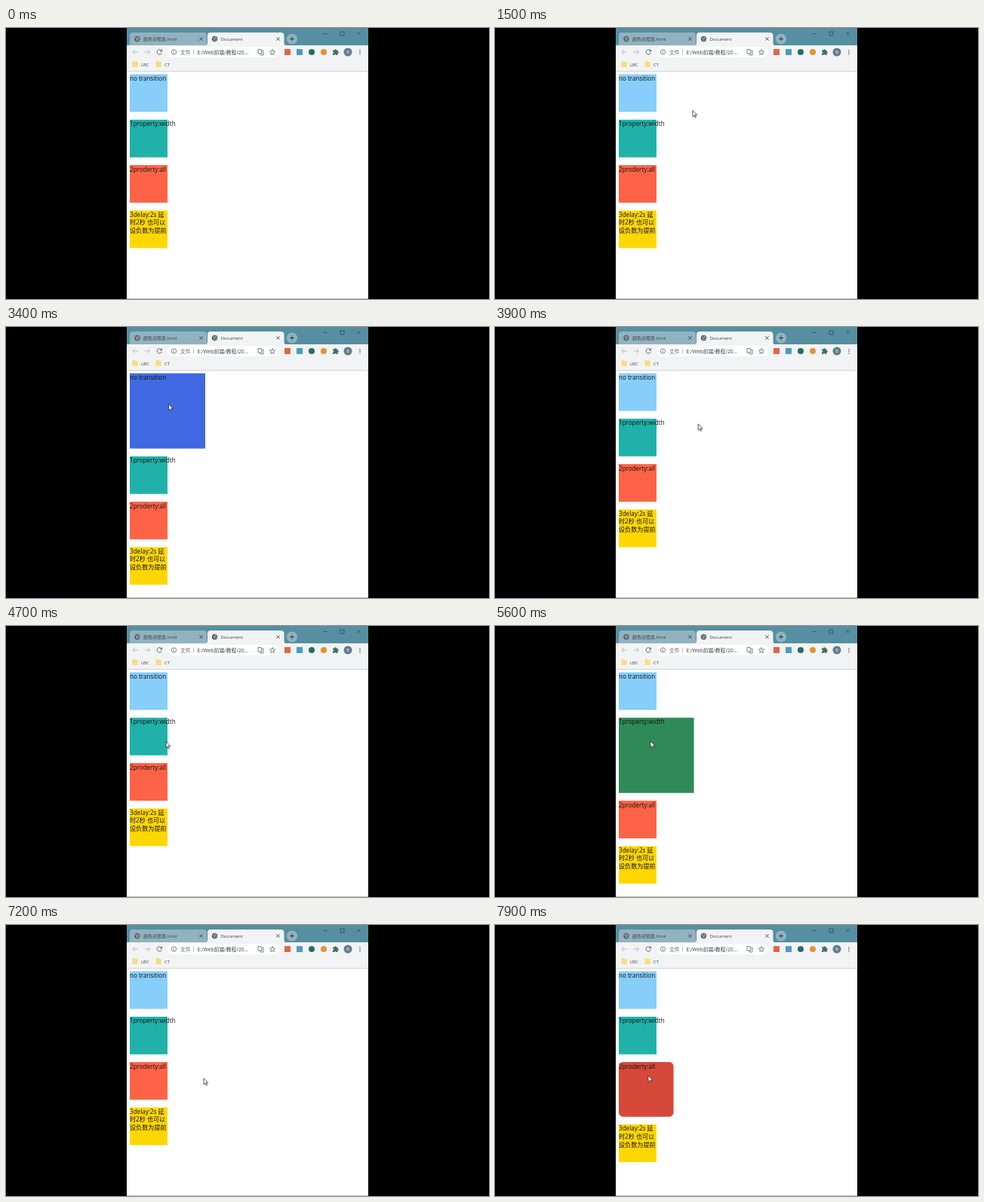
Write an HTML page that moves like this. It is 640x360 px and loops after 8 s.

```html
<!DOCTYPE html>
<html lang="zh-CN">
<head>
<meta charset="utf-8">
<title>Transitions</title>
<style>
html, body { margin: 0; width: 100%; height: 100%; overflow: hidden; background: #000; }
svg { display: block; width: 100vw; height: 100vh; }
text { font-family: "Open Sans", "Noto Sans CJK SC", "Noto Sans CJK", "Noto Sans", sans-serif; white-space: pre; }
.ui { font-size: 6px; fill: #3c4043; }
.page { font-size: 8.1px; fill: #111; }
.line { fill: none; stroke: #5f6368; stroke-width: 1; }
</style>
</head>
<body>
<svg viewBox="0 0 640 360">
  <defs>
    <clipPath id="window"><rect x="160" width="320" height="360"/></clipPath>
    <g id="globe">
      <circle r="3.7" fill="#50575c"/>
      <path d="M-2.5-1.4Q-.6-.9-.2.6L-1 2.5M.2-2.8Q.2-1 2.5-.8M1.2 2.2L2.5.6" fill="none" stroke="#e8eef0" stroke-width=".9"/>
    </g>
    <path id="cross" d="M-2-2L2 2M2-2L-2 2"/>
    <path id="folder" d="M0 1Q0 0 1 0H3L4 1H6.5Q7.3 1 7.3 2V7Q7.3 8 6.5 8H1Q0 8 0 7Z" fill="#f9dc83"/>
  </defs>
  <g clip-path="url(#window)">
    <rect x="160" width="320" height="360" fill="#fff"/>
    <rect x="160" width="320" height="24" fill="#568fa2"/>
    <path d="M162 23Q164 23 164 20V10Q164 6 168 6H262Q266 6 266 10V23Z" fill="#91b3bf"/>
    <rect x="160" y="23" width="320" height="34" fill="#f2f3f4"/>
    <path d="M264 23.5Q267 23 267 19V10Q267 6 271 6H364Q368.500 6 368.500 10V19Q368.500 23 371 23.500Z" fill="#f2f3f4"/>
    <path d="M160 57.500H480" stroke="#d0d3d6"/>
    <use href="#globe" x="174" y="14.500"/>
    <use href="#globe" x="276.500" y="14.500"/>
    <text class="ui" x="182" y="17">颜色对照表.html</text>
    <text class="ui" x="284.500" y="17">Document</text>
    <g class="line" style="stroke:#30393d">
      <use href="#cross" x="258.500" y="14.500"/>
      <use href="#cross" x="360.500" y="14.500"/>
    </g>
    <circle cx="379" cy="14.500" r="7" fill="#91b3bf"/>
    <path class="line" style="stroke:#30393d" d="M376 14.500H382M379 11.500V17.500"/>
    <g class="line" style="stroke:#29434d;stroke-width:.7">
      <path d="M420.500 7.500H425.500M443 5H448V10H443Z"/>
      <use href="#cross" x="467.500" y="7.300"/>
    </g>

    <g class="line">
      <path d="M175 32H168M171 29L168 32L171 35M183.500 32H190.500M187.500 29L190.500 32L187.500 35" stroke="#babdc0"/>
      <path d="M206 30.200A3.200 3.200 0 1 0 206.300 33M206.500 28.500V31H204"/>
    </g>
    <rect x="214" y="25" width="148" height="14" rx="7" fill="#fff"/>
    <g class="line" style="stroke-width:.8">
      <circle cx="222.500" cy="32" r="3.200"/>
      <path d="M222.500 31.500V34M222.500 29.800V30.600"/>
      <path d="M248.500 28.500V35.500" stroke="#a7abae"/>
      <path d="M334 28.500H338L339 34H334ZM339 30H341V36H337.500L336.500 34"/>
      <path d="M353 28.500L354 30.900 356.600 31.100 354.600 32.800 355.200 35.400 353 34 350.800 35.400 351.400 32.800 349.400 31.100 352 30.900Z"/>
    </g>
    <text class="ui" x="231" y="34.500" style="font-size:6.800px;fill:#5f6368">文件</text>
    <text class="ui" x="253.500" y="34.500" style="font-size:6.800px">E:/Web前端/教程/20...</text>
    <rect x="369" y="28" width="8" height="8" fill="#dc6845"/>
    <rect x="385" y="28" width="8" height="8" fill="#4a9cc4"/>
    <circle cx="405" cy="32" r="4" fill="#266d61"/>
    <circle cx="421" cy="32" r="4" fill="#e29332"/>
    <path d="M433 29.500H435.200A1.300 1.300 0 0 1 437.800 29.500H439.500V31.200A1.300 1.300 0 0 1 439.500 33.800V36H437.500A1.300 1.300 0 0 0 435 36H433V33.800A1.300 1.300 0 0 0 433 31.200Z" fill="#3f6f68"/>
    <circle cx="453" cy="32" r="5.500" fill="#607d8b"/>
    <text x="453" y="34" text-anchor="middle" font-size="5.500" fill="#fff">B</text>
    <path d="M469 29V35.500" stroke="#4b5053" stroke-width="1.300" stroke-dasharray="1.300"/>

    <use href="#folder" x="167.500" y="44"/>
    <use href="#folder" x="198.500" y="44"/>
    <text class="ui" x="179" y="50.500">LBC</text>
    <text class="ui" x="210" y="50.500">CT</text>

    <g id="boxes"></g>
    <path d="M160 359.500H480" stroke="#bfc2c4"/>
    <path id="cursor" d="M0 0V8.200L1.900 6.500 3.200 9.500 4.500 8.900 3.200 6H5.800Z" fill="#fff" stroke="#222" stroke-width=".75"/>
  </g>
</svg>
<script>
const LOOP = 8000, STEP = 100, SIZE = 50, GAP = 10.3, LEFT = 164, TOP = 61.5;

// Pointer keys: time, x, y
const path = [
  [0, 484, 88], [500, 370, 96], [1000, 275, 108], [1300, 262, 109.5], [1800, 262, 109.5],
  [2400, 200, 99], [2900, 196, 99], [3400, 215.500, 102.500], [3750, 265, 115],
  [4000, 272, 138], [4400, 258, 154], [4700, 212, 153.500], [5000, 206, 153], [5600, 206, 153],
  [6000, 228, 161], [6200, 262, 178], [6300, 278.500, 188], [6700, 284, 196],
  [7100, 274, 204], [7600, 214, 202], [7900, 203, 200], [8000, 201, 200]
];

const boxes = [
  { lines: ["no transition"], color: [135, 206, 250], hover: [65, 105, 225], on: 2250, off: 3750 },
  { lines: ["1property:width"], color: [32, 178, 170], hover: [46, 139, 87], on: 4720, off: 6240, smooth: "width" },
  { lines: ["2proderty:all"], color: [255, 99, 71], hover: [165, 42, 42], on: 7630, off: 9000, smooth: "all" },
  { lines: ["3delay:2s 延", "时2秒 也可以", "设负数为提前"], color: [255, 215, 0], hover: [255, 215, 0], on: 9000, off: 9000 }
];

const mix = (a, b, k) => a + (b - a) * k;

// CSS "ease": cubic-bezier(.25, .1, .25, 1)
function ease(x) {
  if (x <= 0 || x >= 1) return x <= 0 ? 0 : 1;
  const bezier = (u, a, b) => 3 * u * (1 - u) ** 2 * a + 3 * u * u * (1 - u) * b + u ** 3;
  let low = 0, high = 1;
  for (let i = 0; i < 24; i++) {
    const mid = (low + high) / 2;
    if (bezier(mid, .25, .25) < x) low = mid; else high = mid;
  }
  return bezier(low, .1, 1);
}

const svgNode = (name, attrs, parent) => {
  const node = document.createElementNS("http://www.w3.org/2000/svg", name);
  setAttrs(node, attrs);
  return parent.appendChild(node);
};
function setAttrs(node, attrs) {
  for (const key in attrs) node.setAttribute(key, attrs[key]);
}

const cursor = document.getElementById("cursor");
for (const box of boxes) {
  box.group = svgNode("g", {}, document.getElementById("boxes"));
  box.rect = svgNode("rect", {}, box.group);
  box.lines.forEach((line, i) => {
    svgNode("text", { class: "page", y: 8.500 + i * 10.600 }, box.group).textContent = line;
  });
}

function pointerAt(t) {
  const next = Math.max(1, path.findIndex(key => key[0] >= t));
  const [a, b] = [path[next - 1], path[next]];
  const k = (t - a[0]) / (b[0] - a[0]);
  return [mix(a[1], b[1], k), mix(a[2], b[2], k)];
}

function render(t) {
  let y = TOP;
  for (const box of boxes) {
    const instant = t >= box.on && t < box.off ? 1 : 0;
    const eased = ease((t - box.on) / 1000) - ease((t - box.off) / 1000);
    const widthK = box.smooth ? eased : instant;
    const restK = box.smooth === "all" ? eased : instant;
    const height = SIZE * (1 + restK);
    setAttrs(box.group, { transform: `translate(${LEFT} ${y})` });
    setAttrs(box.rect, {
      width: SIZE * (1 + widthK),
      height,
      rx: box.smooth === "all" ? 12 * restK : 0,
      fill: `rgb(${box.color.map((c, i) => Math.round(mix(c, box.hover[i], restK)))})`
    });
    y += height + GAP;
  }
  setAttrs(cursor, { transform: `translate(${pointerAt(t)})` });
}

const start = performance.now();
function tick() {
  const t = (performance.now() - start) % LOOP;
  render(Math.floor(t / STEP) * STEP);
  requestAnimationFrame(tick);
}
tick();
</script>
</body>
</html>
```
